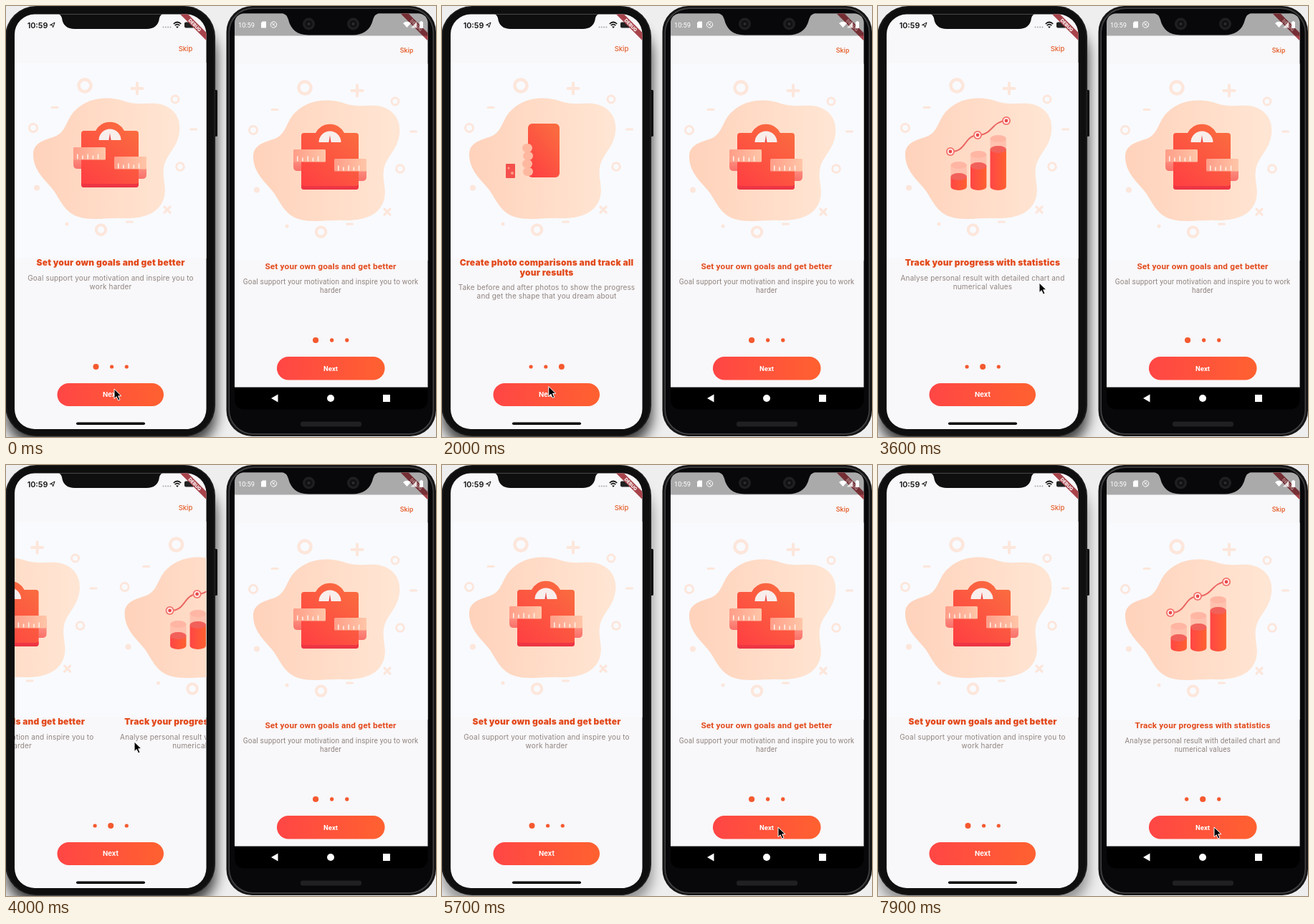
An HTML page that plays this animation: 600 px wide and 601 px high, repeating every 8 s.

```html
<!DOCTYPE html>
<html lang="en">
<head>
<meta charset="utf-8">
<title>Onboarding on two phones</title>
<style>
html, body { margin: 0; width: 100%; height: 100%; overflow: hidden; background: #eee; }
svg { display: block; width: 600px; height: 601px; }
text { text-anchor: middle; }
.ios { font-family: Inter, "Open Sans", sans-serif; }
.droid { font-family: Roboto, "Noto Sans", sans-serif; }
.title { fill: #e34a1c; }
.ios .title { font-size: 12px; font-weight: 900; letter-spacing: .2px; }
.droid .title { font-size: 11.8px; font-weight: 700; letter-spacing: .16px; }
.sub { fill: #908580; font-size: 10px; letter-spacing: .16px; }
.droid .sub { letter-spacing: .2px; }
.skip { fill: #e5622f; font-size: 9.5px; font-weight: 500; }
.next { fill: #fff; font-size: 9.5px; font-weight: 700; }
.debug { fill: #fff; font-size: 6.4px; font-weight: 800; }
.deco { fill: none; stroke: #fde6db; stroke-linecap: round; }
</style>
</head>
<body>
<svg viewBox="0 0 600 601">
  <defs>
    <linearGradient id="blob"><stop stop-color="#ffd2bb"/><stop offset="1" stop-color="#ffe6d4"/></linearGradient>
    <linearGradient id="hot"><stop stop-color="#ff4645"/><stop offset="1" stop-color="#ff6130"/></linearGradient>
    <linearGradient id="body" x1="0" y1="1" x2=".7" y2="0"><stop stop-color="#ff3c42"/><stop offset="1" stop-color="#fa6a40"/></linearGradient>
    <linearGradient id="tape"><stop stop-color="#ff9d88"/><stop offset="1" stop-color="#ffc6a8"/></linearGradient>
    <linearGradient id="curl" x1="0" y1="0" x2="0" y2="1"><stop stop-color="#ffa48f"/><stop offset="1" stop-color="#f9706a"/></linearGradient>
    <filter id="soft" x="-20%" y="-10%" width="140%" height="120%"><feGaussianBlur stdDeviation="9"/></filter>
    <clipPath id="iosClip"><rect x="12" y="11.5" width="267.5" height="578.5" rx="28"/></clipPath>
    <clipPath id="droidClip"><rect x="319" y="10.5" width="269.500" height="552" rx="13"/></clipPath>
  </defs>
  <rect width="600" height="601" fill="#eee"/>
  <rect id="shade" x="0" y="28" width="293" height="584" rx="40" filter="url(#soft)"/>
  <g id="ios" class="ios"></g>
  <g id="droid" class="droid"></g>
  <path id="cursor" d="M0 0V13.6L3.2 10.7L5.5 16L8 14.9L5.7 9.8H10Z" stroke="#fff" stroke-width="1"/>
</svg>
<script>
const $ = id => document.getElementById(id);
const rect = (x, y, w, h, fill, rx = 0) => `<rect x="${x}" y="${y}" width="${w}" height="${h}" rx="${rx}" fill="${fill}"/>`;
const circle = (x, y, r, fill) => `<circle cx="${x}" cy="${y}" r="${r}" fill="${fill}"/>`;
const line = (d, stroke, w) => `<path d="${d}" fill="none" stroke="${stroke}" stroke-width="${w}"/>`;
const fill = (d, color) => `<path d="${d}" fill="${color}"/>`;
const label = (cls, x, y, s) => `<text class="${cls}" x="${x}" y="${y}">${s}</text>`;

// Shared backdrop of every illustration
const rings = [[110, 111, 8.5, 4.5], [236, 130, 5, 3], [38, 170, 5.5, 3], [243, 224, 5.3, 3], [132.5, 312, 6.7, 4]];
const backdrop = fill(`M38 207C38 190 54 187 68 182C84 176 84 158 96 146C115 127 143 125 166 133C186 140 204 132 222 139
  C241 147 246 166 240 185C235 201 222 210 220 226C218 243 225 253 220 269C213 290 190 297 163 296
  C142 295 122 300 101 294C82 288 76 271 67 258C57 244 38 231 38 207Z`, 'url(#blob)') +
  '<g class="deco">' +
  rings.map(([x, y, r, w]) => `<circle cx="${x}" cy="${y}" r="${r}" stroke-width="${w}"/>`).join('') +
  line('M175.5 115H190.5M183 107.5V122.5', '#fde6db', 4) +
  line('M221 280L229 288M229 280L221 288', '#fde6db', 3.2) +
  line('M64 141.5H72M257.5 172H265.5M168.5 301H176.5', '#fde6db', 3) + '</g>' +
  circle(43, 253.5, 4, '#fde6db') + circle(85, 304, 2.5, '#fde6db');

const ticks = (x, y, n) => Array.from({length: n}, (_, i) =>
  rect(x + i * 7.2, y + (i % 2 ? 2 : 0), 1.5, i % 2 ? 5 : 7, '#fff3ec')).join('');

const scaleArt =
  fill('M94 201V221Q94 227 100 227H107V201Z', 'url(#curl)') +
  fill('M196 214V235Q196 241 190 241H183V214Z', 'url(#curl)') +
  fill('M109 174H125A22.5 22.5 0 0 1 165 174H181Q185 174 185 178V249Q185 253 181 253H109Q105 253 105 249V178Q105 174 109 174Z', 'url(#body)') +
  fill('M105 245Q105 248 109 248H181Q185 248 185 245V249Q185 253 181 253H109Q105 253 105 249Z', '#ed3544') +
  fill('M129.5 187A15.5 15.5 0 0 1 160.5 187Z', '#f8eeec') +
  fill('M145 177L146.5 187H143.5Z', '#e94d49') +
  rect(94, 197, 45, 17.5, 'url(#tape)', 1.5) + ticks(99, 206.5, 5) +
  rect(151, 210, 45, 17.5, 'url(#tape)', 1.5) + ticks(156, 219.5, 5);

const tube = (x, top, h, side, lid) =>
  fill(`M${x} ${top}V${top + h}a11.2 5 0 0 0 22.4 0V${top}Z`, side) +
  `<ellipse cx="${x + 11.2}" cy="${top}" rx="11.2" ry="5" fill="${lid}"/>`;
const bar = (x, ghost, top) =>
  `<g opacity=".75">${tube(x, ghost, top - ghost, '#ffb9a6', '#ffaa98')}</g>` +
  tube(x, top, 252 - top, 'url(#hot)', '#f2605a');
const node = (x, y) => circle(x, y, 6, '#f4736c') + circle(x, y, 4.2, '#fff1ed') + circle(x, y, 2.4, '#ea4a4d');
const chartArt = bar(101.5, 222, 238) + bar(129, 207, 223) + bar(156.5, 185, 200) +
  line('M101 203C123 204 120 181 139 180C160 180 158 161 179 160', '#ea6762', 2) +
  node(101, 203) + node(139, 180) + node(179, 160);

const photoArt = rect(89, 220, 13, 20, '#f4504c', 1) + circle(93, 226, 1.5, '#ff9d88') + circle(98, 233, 2, '#ff9d88') +
  rect(120, 164, 44, 75, 'url(#body)', 6) +
  [192, 203, 214, 225].map((y, i) => rect(112 + i % 2, y, 14, 12, '#ffb8a0', 6)).join('');

const arts = [scaleArt, chartArt, photoArt];
const titles = [['Set your own goals and get better'], ['Track your progress with statistics'],
  ['Create photo comparisons and track all', 'your results']];
const shared = [['Analyse personal result with detailed chart and', 'numerical values'],
  ['Take before and after photos to show the progress', 'and get the shape that you dream about']];
const subs = {
  ios: [['Goal support your motivation and inspire you to', 'work harder'], ...shared],
  droid: [['Goal support your motivation and inspire you to work', 'harder'], ...shared]
};

const pages = (kind, left, width, cx, artX, artY, dy) => arts.map((art, i) => `<g transform="translate(${i * width} 0)">` +
  rect(left, 79 + artY / 2, width, 273 + artY / 2, '#f8fafe') +
  `<g transform="translate(${artX} ${artY})">${backdrop}${art}</g>` +
  titles[i].map((s, k) => label('title', cx, 362 + dy + k * 13.5, s)).join('') +
  subs[kind][i].map((s, k) => label('sub', cx, 382.5 + dy + (titles[i].length - 1) * 13.5 + k * 12, s)).join('') + '</g>').join('');

const banner = (x, y, k) => `<g transform="translate(${x} ${y}) rotate(45) scale(${k})">` +
  rect(-40, 28, 80, 12, '#a8434b') + '</g>';
const bannerText = (x, y, opacity) =>
  `<g transform="translate(${x} ${y}) rotate(45)" opacity="${opacity}">${label('debug', 0, 24.4, 'DEBUG')}</g>`;
const dots = id => [0, 1, 2].map(i => `<circle id="${id}${i}" fill="#f4592f"/>`).join('');
const wifi = (x, y, c) => fill(`M${x} ${y + 4}L${x - 5.5} ${y - 2}Q${x} ${y - 6.5} ${x + 5.5} ${y - 2}Z`, c);

$('ios').innerHTML =
  rect(289, 117, 6, 65, '#111', 1.5) + rect(-1, 0, 293, 600, '#1d1d1e', 43) + rect(1, 1, 289, 598, '#0f0f10', 42) +
  '<g clip-path="url(#iosClip)">' + rect(12, 11, 268, 579, '#f8f7f9') +
  `<g id="iosPages">${pages('ios', 12, 267, 146, 0, 0, 0)}</g>` +
  fill('M71 10Q77 12 78 17Q80 32 96 32H196Q212 32 214 17Q215 12 221 10Z', '#0f0f10') +
  '<text x="44" y="30.5" font-size="10.8" font-weight="600" fill="#111">10:59</text>' +
  line('M61.5 26.5L68 23L65.5 30L64.8 26.8Z', '#111', 1) +
  [219.5, 222.8, 226.1, 229.4].map(x => circle(x, 29.5, 1, '#aaa')).join('') +
  line('M233.8 25Q239 20 244.2 25M235.7 27.2Q239 24.2 242.3 27.2', '#111', 1.7) + fill('M237 28.5H241L239 31Z', '#111') +
  rect(249, 22.5, 14, 8, '#222', 2) +
  banner(279, 11, .645) + bannerText(279, 11, 1) +
  label('skip', 250.5, 63, 'Skip') + dots('iosDot') +
  rect(71.5, 526, 148.5, 32, 'url(#hot)', 16) + label('next', 146, 545, 'Next') +
  rect(98, 580.5, 96, 3.5, '#070707', 1.75) + '</g>';

$('droid').innerHTML =
  rect(307.5, 0, 292.5, 600, '#161617', 36) + rect(310.5, 2.5, 286.5, 595, '#434345', 34) +
  rect(312, 4, 283.5, 592, '#08080a', 33) +
  '<g clip-path="url(#droidClip)">' + rect(319, 10, 270, 522, '#f8f7f9') +
  `<g id="droidPages">${pages('droid', 319, 269, 453, 307, 3, 5)}</g>` +
  banner(588, 11, .654) +
  rect(319, 10, 270, 31.5, '#00000050') +
  bannerText(588, 11, .45) +
  '<text x="335.5" y="29.5" font-size="9.3" fill="#fff">10:59</text>' +
  fill('M356 23.5L358 21.5H363V30.5H356Z', '#fff') +
  '<circle cx="373.5" cy="26" r="4.2" fill="none" stroke="#fff"/>' + line('M370.5 23L376.5 29M372 27L375 24', '#fff', 1) +
  wifi(559.5, 26, '#fff') + fill('M565 30.5L573 22V30.5Z', '#ffffffcc') +
  rect(577, 22, 5, 9, '#fff', .8) + rect(578.5, 21, 2, 2, '#fff') +
  label('skip', 559, 65, 'Skip') + dots('droidDot') +
  rect(378, 489, 150.5, 32.5, 'url(#hot)', 16) + label('next', 453, 508.7, 'Next') +
  rect(319, 531.6, 270, 31, '#000') + '</g>' +
  fill('M383 9Q392 11 394 19C397 32 406 40.5 422 40.5H484C500 40.5 509 32 512 19Q514 11 523 9Z', '#08080a') +
  [422.5, 484.5].map(x => circle(x, 25, 8.5, '#1f1f21') + circle(x, 25, 5, '#111114') + circle(x, 25, 2, '#2c2c31')).join('') +
  fill('M370 547L379.5 541.5V552.5Z', '#fff') + circle(453, 547, 5, '#fff') + rect(526, 542, 10, 10, '#fff') +
  rect(411, 579.5, 85, 7, '#202022', 3);

// Keys are [time, ...values]; each segment eases towards its end
const ease = p => p * p * (3 - 2 * p);
const out = p => 1 - (1 - p) ** 2;
function track(keys, t, curve = ease) {
  const k = keys.findIndex(key => key[0] > t);
  if (k < 0) return keys[keys.length - 1].slice(1);
  if (!k) return keys[0].slice(1);
  const a = keys[k - 1], b = keys[k], p = curve((t - a[0]) / (b[0] - a[0]));
  return a.slice(1).map((v, i) => v + (b[i + 1] - v) * p);
}
const iosKeys = [[500, 0], [900, 1], [1500, 1], [1900, 2], [2560, 2], [2800, 1.446], [3200, 1],
  [3850, 1], [4090, .446], [4490, 0]];
const droidKeys = [[7200, 0], [7600, 1]];
const cursorKeys = [[0, 151, 534], [1950, 151, 534], [2450, 75, 412], [2560, 75, 412], [2800, 223, 406], [3050, 225, 386],
  [3600, 225, 386], [3820, 77, 390], [3850, 77, 390], [4090, 225, 384], [4250, 235, 384], [4700, 497, 497],
  [5100, 497, 497], [5600, 469, 505]];

function setDots(id, page, cx, cy, k) {
  const active = Math.round(page);
  let x = cx - 24.5 * k;
  for (let i = 0; i < 3; i++) {
    const r = (i === active ? 4 : 2.6) * k, dot = $(id + i);
    dot.setAttribute('cx', x + r);
    dot.setAttribute('cy', cy);
    dot.setAttribute('r', r);
    x += 2 * r + 15.5 * k;
  }
}
function draw(now) {
  const t = now % 8000;
  const [left] = track(iosKeys, t, out), [right] = track(droidKeys, t);
  const [x, y] = track(cursorKeys, t);
  $('iosPages').setAttribute('transform', `translate(${-left * 267} 0)`);
  $('droidPages').setAttribute('transform', `translate(${-right * 269} 0)`);
  $('cursor').setAttribute('transform', `translate(${x} ${y})`);
  $('shade').setAttribute('opacity', t < 4900 ? .75 : .4);
  setDots('iosDot', left, 146, 503, 1);
  setDots('droidDot', right, 453, 466, 1.02);
  requestAnimationFrame(draw);
}
requestAnimationFrame(draw);
</script>
</body>
</html>
```
